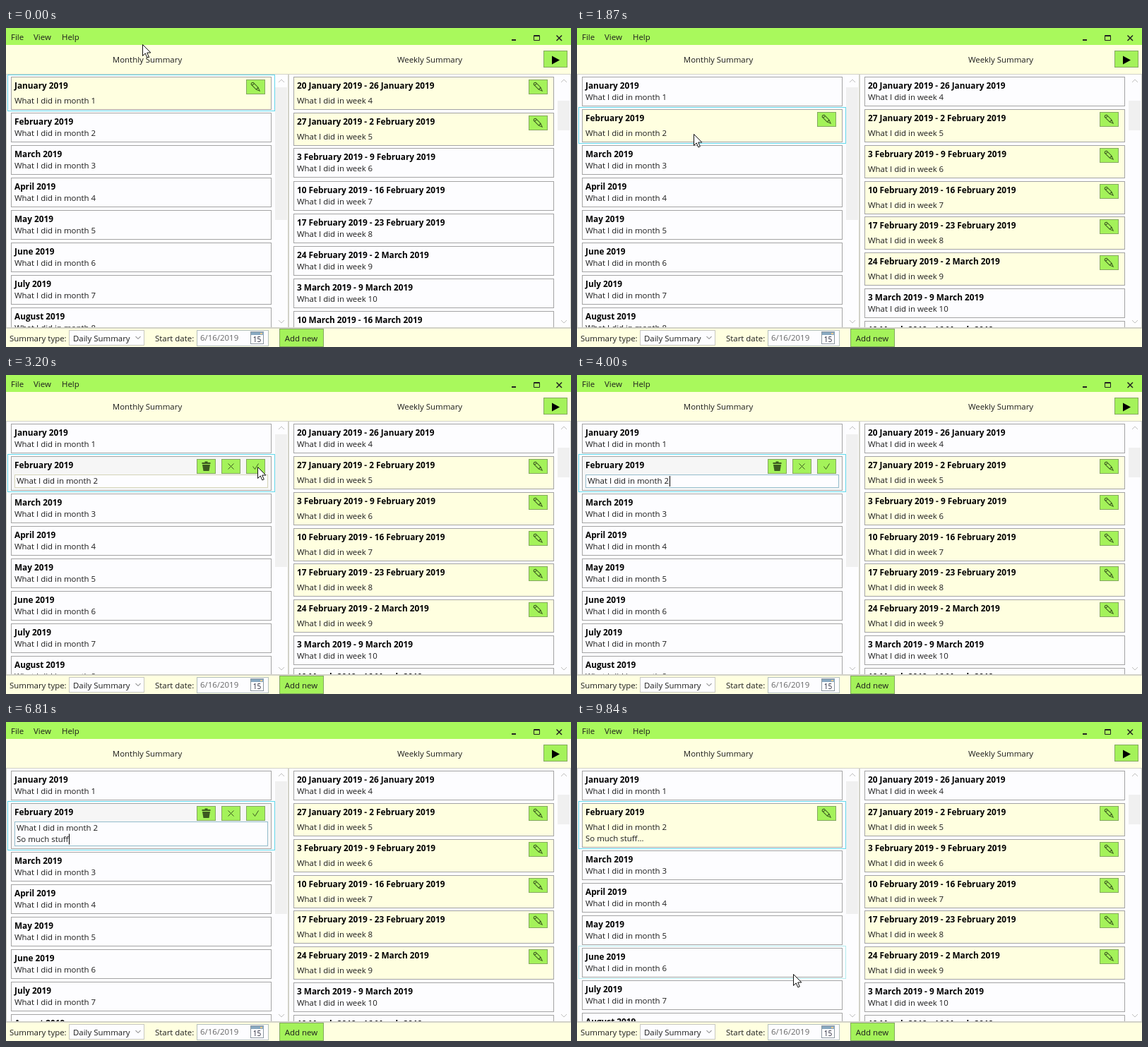
Write an HTML page that moves like this. It is 800 px wide and 452 px high and loops after 9.87 s.

```html
<!DOCTYPE html>
<html lang="en">
<head>
<meta charset="utf-8">
<title>Summaries</title>
<style>
  html, body { margin: 0; width: 100%; height: 100%; overflow: hidden; background: #ffffe0; }
  svg { display: block; width: 100vw; height: 100vh; }
  text { font: 11.45px "Open Sans", "Noto Sans", sans-serif; fill: #1c1c1c; white-space: pre; }
  .b { font-weight: 700; font-size: 11.8px; fill: #000; }
  .m { text-anchor: middle; }
</style>
</head>
<body>
<svg id="stage" viewBox="0 0 800 452"></svg>
<script>
const LOOP = 9870, SELECT = 1800, EDIT = 3080, FOCUS = 3940, ENTER = 4700, SAVE = 8720;
const WHITE = '#fdfdff', YELLOW = '#ffffe0', GREEN = '#a4f25a', INK = '#3c5a20';
const EDGE = '#a4a4a4', FRAME = '#d2d2c8', BUTTON_EDGE = '#84a860';
const NORMAL = 46.1, TALL = 50.7;
const TYPED = 'So much stuff...';
const keyTimes = [5000, 5200, 5330, 5470, 5640, 5770, 5870, 6040, 6170, 6410, 6540, 6670, 6810, 7070, 7210, 7340];
// time, x, y of the pointer tip; a repeated place is a rest
const path = [
  [0, 193, 23], [70, 193, 23], [400, 112, 188], [930, 112, 188], [1270, 103, 203], [1720, 165, 150],
  [1860, 165, 150], [2300, 312, 152], [2800, 354, 130], [3080, 354, 130], [3200, 356, 130], [3250, 356, 130],
  [3770, 165, 150], [8040, 165, 150], [8450, 351, 132], [9180, 351, 132],
  [9440, 322, 357], [9640, 322, 357], [9840, 306, 357], [LOOP, 306, 357]
];
const months = 'January February March April May June July August September October November December'.split(' ');
const stage = document.getElementById('stage');
const ctx = document.createElement('canvas').getContext('2d');

const rect = (x, y, w, h, fill, stroke = 'none') =>
  `<rect x="${x + .5}" y="${y + .5}" width="${w}" height="${h}" fill="${fill}" stroke="${stroke}"/>`;
const fill = (x, y, w, h, c) => `<rect x="${x}" y="${y}" width="${w}" height="${h}" fill="${c}"/>`;
const text = (x, y, s, cls = '', style = '') => `<text x="${x}" y="${y}" class="${cls}" style="${style}">${s}</text>`;
const line = (d, c = INK, w = 1) => `<path d="${d}" fill="none" stroke="${c}" stroke-width="${w}"/>`;

const icons = {
  pencil: `<path transform="rotate(45)" d="M-7-2h10l5 2-5 2h-10q-2-2 0-4zM-5-2v4M3-2v4" fill="none" stroke="${INK}"/>`,
  trash: `<path d="M-6-5.5h12v2h-12zM-2-7h4v2h-4zM-5.5-2.5h11l-1.5 9h-8z" fill="${INK}"/>`,
  cross: line('M-4-4l8 8M4-4l-8 8'),
  check: line('M-4 0l3 4 5-8')
};

// Speed along axis a at point k: zero at rests, otherwise the mean slope
function speed(k, a) {
  const b = path[k - 1], p = path[k], n = path[k + 1];
  const still = q => !q || (q[1] === p[1] && q[2] === p[2]);
  return still(b) || still(n) ? 0 : (n[a] - b[a]) / (n[0] - b[0]);
}

function pointer(t) {
  const k = path.findIndex((p, i) => i && t <= p[0]), from = path[k - 1], to = path[k];
  const span = to[0] - from[0], u = (t - from[0]) / span, e = u * u * (3 - 2 * u);
  const at = a => from[a] + (to[a] - from[a]) * e +
    span * u * (1 - u) * (speed(k - 1, a) * (1 - u) - speed(k, a) * u);
  const x = at(1), y = at(2);
  const inTextBox = t >= EDIT && t < SAVE && x > 12 && x < 371 && y > 141 && y < 175;
  return { x, y, shown: !inTextBox };
}

function button(x, y, icon, p) {
  const hot = p && p.x >= x && p.x <= x + 27 && p.y >= y && p.y <= y + 21;
  return rect(x, y, 26, 20, hot ? '#dcfaff' : GREEN, hot ? '#68b4d0' : BUTTON_EDGE) +
    `<g transform="translate(${x + 13.5} ${y + 10.5})" opacity="${hot ? .65 : 1}">${icons[icon]}</g>`;
}

function row(x, y, h, title, lines, selected, p) {
  return rect(x + 7, y, 368, h, selected ? YELLOW : WHITE, EDGE) +
    text(x + 12, y + 17, title, 'b') +
    lines.map((s, i) => text(x + 12, y + (selected ? 38 : 33) + i * 15.5, s)).join('') +
    (selected ? button(x + 340, y + 4, 'pencil', p) : '');
}

function editor(y, h, lines, t, p) {
  const keys = [FOCUS, ENTER, ...keyTimes].filter(k => k <= t);
  const caretOn = keys.length && Math.floor((t - keys[keys.length - 1]) / 530) % 2 === 0;
  const hover = t > FOCUS ? p : null;
  let out = rect(7, y, 368, h, '#f6f6f6', EDGE) + text(12, y + 17, 'February 2019', 'b') +
    rect(12, y + 26, 358, h - 30, WHITE, t < FOCUS ? '#d4d4b8' : '#94bccc') +
    button(270, y + 4, 'trash', hover) + button(305, y + 4, 'cross', hover) + button(340, y + 4, 'check', hover) +
    lines.map((s, i) => text(15, y + 39 + i * 15.5, s)).join('');
  if (caretOn) {
    ctx.font = '11.45px "Open Sans", "Noto Sans", sans-serif';
    const n = lines.length - 1;
    out += fill(Math.round(15.5 + ctx.measureText(lines[n]).width), y + 28 + n * 15.5, 1, 15, '#000');
  }
  return out;
}

function monthList(t, p) {
  const current = t < SELECT ? 0 : 1, editing = t >= EDIT && t < SAVE;
  let top = 69, out = '';
  for (let i = 0; i < 8; i++) {
    const lines = ['What I did in month ' + (i + 1)], edit = editing && i === 1;
    if (i === 1 && t >= ENTER) lines.push(TYPED.slice(0, keyTimes.filter(k => k <= t).length));
    const step = (edit ? 52.6 : i === current ? TALL : NORMAL) + (lines.length - 1) * 15.8;
    const y = Math.round(top), h = Math.round(step - 4.8);
    out += edit ? editor(y, h, lines, t, p) : row(0, y, h, months[i] + ' 2019', lines, i === current, p);
    const hover = p.x > 2 && p.x < 381 && p.y >= y - 2 && p.y < y + h + 2;
    if (i === current) out += rect(2, y - 3, 378, h + 5, 'none', '#62d8ea');
    else if (hover) out += rect(2, y - 3, 378, h + 5, 'none', '#b4ecee');
    top += step;
  }
  return out;
}

function weekList(t) {
  const day = n => {
    const d = new Date(Date.UTC(2019, 0, n));
    return `${d.getUTCDate()} ${months[d.getUTCMonth()]} 2019`;
  };
  let top = 69, out = '';
  for (let i = 0; i < 8; i++) {
    const selected = t < SELECT ? i < 2 : i > 0 && i < 6;
    const step = selected ? TALL : NORMAL, first = 20 + i * 7;
    out += row(400, Math.round(top), Math.round(step - 4.8), `${day(first)} - ${day(first + 6)}`,
      ['What I did in week ' + (i + 4)], selected);
    top += step;
  }
  return out;
}

const scrollbar = (x, y, h) => fill(x + 381, y, 17, h, '#f0f0f0') +
  line(`M${x + 386} 77l4-4 4 4M${x + 386} 414l4 4 4-4`, '#c0c0c0');

const back = fill(0, 0, 800, 452, YELLOW) + fill(0, 0, 800, 24, '#a9f95c') +
  text(7, 17, 'File') + text(39, 17, 'View') + text(79, 17, 'Help') +
  fill(716, 16, 6, 2, '#222') + line('M747.5 10.5h8v7h-8zM747 11.5h9', '#222') +
  line('M779.5 10.5l7.5 7.5M787 10.5l-7.5 7.5', '#222', 1.5) +
  text(200, 49, 'Monthly Summary', 'm') + text(600, 49, 'Weekly Summary', 'm') +
  rect(761, 32, 33, 23, GREEN, BUTTON_EDGE) + '<path d="M773 39.5v12l11-6z"/>' +
  rect(0, 65, 399, 359, WHITE, FRAME) + rect(400, 65, 399, 359, WHITE, FRAME) +
  scrollbar(0, 84, 188) + scrollbar(400, 103, 42);

const footer = fill(0, 425, 800, 27, YELLOW) + fill(0, 425, 800, 1, FRAME) +
  text(5, 444, 'Summary type:') + rect(89, 428, 106, 21, WHITE, '#c8c8c0') +
  text(95, 444, 'Daily Summary') + line('M183.5 437l3.5 3.5 3.5-3.5', '#666') +
  text(211, 444, 'Start date:') + rect(270, 428, 101, 22, WHITE, '#b4c0bc') +
  text(275, 443, '6/16/2019', '', 'fill:#666') +
  rect(346, 430, 18, 17, WHITE, '#8c98a0') + fill(347, 431, 18, 4, '#88a8c0') + fill(360, 432, 3, 2, '#e8c890') +
  text(355.5, 445, '15', 'm', 'font-size:10px;fill:#223') +
  rect(387, 426, 62, 25, GREEN, BUTTON_EDGE) + text(418, 444, 'Add new', 'm');

const start = performance.now();
let last = '';
function draw() {
  const t = (performance.now() - start) % LOOP, p = pointer(t);
  const arrow = p.shown ? `<path transform="translate(${Math.round(p.x) + .5} ${Math.round(p.y) + .5})"
    d="M0 0v16l3.7-3.6 2.6 6 2.5-1-2.6-5.9h5.2z" fill="#fff" stroke="#111"/>` : '';
  const svg = '<clipPath id="lists"><path d="M0 66h800v358H0z"/></clipPath>' + back +
    `<g clip-path="url(#lists)">${monthList(t, p)}${weekList(t)}</g>` + footer + arrow;
  if (svg !== last) stage.innerHTML = last = svg;
  requestAnimationFrame(draw);
}
draw();
</script>
</body>
</html>
```
